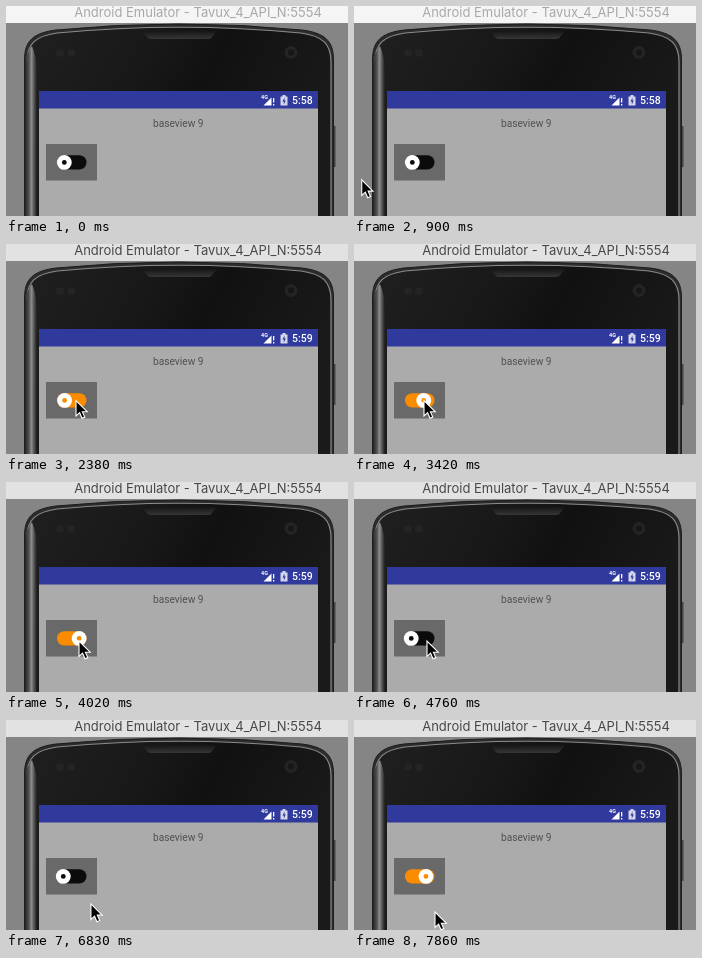
Write an HTML page that moves like this. It is 342 px wide and 210 px high and loops after 8000 ms.

```html
<!DOCTYPE html>
<html lang="en">
<head>
<meta charset="utf-8">
<title>Toggle switch in an emulator</title>
<style>
  html, body { margin: 0; width: 100%; height: 100%; overflow: hidden; background: #858585; }
  svg { display: block; width: 342px; height: 210px; }
  .title { font: 13px Inter, sans-serif; }
  .app { font-family: Roboto, sans-serif; }
</style>
</head>
<body>
<svg viewBox="0 0 342 210">
  <defs>
    <linearGradient id="body" x2="1" y2=".35">
      <stop offset="0" stop-color="#202020"/>
      <stop offset=".4" stop-color="#181818"/>
      <stop offset=".6" stop-color="#111"/>
      <stop offset="1" stop-color="#1a1a1a"/>
    </linearGradient>
    <linearGradient id="edge">
      <stop offset="0" stop-color="#303030"/>
      <stop offset=".25" stop-color="#505050"/>
      <stop offset=".5" stop-color="#8c8c8c"/>
      <stop offset=".75" stop-color="#505050"/>
      <stop offset="1" stop-color="#1c1c1c"/>
    </linearGradient>
    <linearGradient id="speaker" x2="0" y2="1">
      <stop offset="0" stop-color="#161616"/>
      <stop offset="1" stop-color="#363636"/>
    </linearGradient>
  </defs>

  <rect width="342" height="210" fill="#858585"/>
  <rect id="bar" width="342" height="17"/>
  <text id="title" class="title" x="192" y="11" text-anchor="middle">Android Emulator - Tavux_4_API_N:5554</text>

  <!-- phone -->
  <path d="M328 120h1.500v41h-1.500z" fill="#444"/>
  <path d="M18.500 215V54C18.500 35 27 27 50 24Q173 12 296 24C319 27 327.500 35 327.500 54V215z" fill="#2c2c2c" stroke="#1c1c1c"/>
  <path d="M21 215V56C21 38 29 30 51 27Q173 15.500 295 27C317 30 325 38 325 56V215z" fill="url(#body)" stroke="#8a8a8a" stroke-width="1.200"/>
  <path d="M20 210V58Q20 46 26 40Q31 52 31 66V210z" fill="url(#edge)"/>
  <path d="M136 25H211L206 31Q205 33 201 33H146Q142 33 141 31z" fill="url(#speaker)"/>
  <g fill="#242424">
    <circle cx="54" cy="47" r="4"/>
    <circle cx="65" cy="47" r="4"/>
    <circle cx="285" cy="46.500" r="6.500"/>
  </g>
  <circle cx="285" cy="46.500" r="3" fill="#17171b"/>

  <!-- screen -->
  <rect x="33" y="85" width="279" height="125" fill="#ababab"/>
  <rect x="33" y="85" width="279" height="17.500" fill="#30399c"/>
  <g class="app" fill="#fff">
    <text x="255" y="93" font-size="5.500" font-weight="700">4G</text>
    <path d="M257.500 99.500L265.500 91.500V99.500z"/>
    <path d="M267 92h1.300v4.500h-1.300zM267 98h1.300v1.500h-1.300z"/>
    <path d="M274.500 90.500h2v-1.500h3v1.500h2v9h-7z" opacity=".8"/>
    <path d="M278.500 91.500l-2 4h1.300v3l2-4H278.500z" fill="#30399c"/>
    <text id="clock" x="286" y="98" font-size="10.500" font-weight="500"></text>
  </g>
  <text class="app" x="172.300" y="121" text-anchor="middle" font-size="10.200" fill="#505050">baseview 9</text>
  <rect x="40" y="138" width="51" height="36.500" fill="#696969"/>

  <!-- switch -->
  <rect id="track" x="51" y="149.200" width="29.500" height="14.400" rx="7.200"/>
  <g id="thumb">
    <circle r="7.400" cy="156.400" fill="#fff"/>
    <circle id="dot" r="2.400" cy="156.400"/>
  </g>

  <path id="cursor" d="M0 0V15.500L3.600 12.200L6 17.800L8.800 16.600L6.400 11.200H11.200z" fill="#000" stroke="#fff" stroke-width="1.100"/>
</svg>
<script>
  const LOOP = 8000, STEP = 148.2, START = 600;
  const OFF_X = 58.3, ON_X = 73.2;
  const $ = id => document.getElementById(id);
  const paint = (id, color) => $(id).setAttribute('fill', color);
  const move = (id, ...xy) => $(id).setAttribute('transform', `translate(${xy})`);

  // Evenly spaced clicks; each one flips the switch, which begins off.
  const series = (first, gap, count) => Array.from({ length: count }, (_, i) => first + i * gap);
  const clicks = [...series(2375, 450, 3), ...series(4310, 1122, 4)];

  // The pointer rests between these eased moves.
  const moves = [
    { from: 600, to: 1490, x: 70, y: 156.5 },
    { from: 3420, to: 4010, x: 73, y: 159 },
    { from: 5340, to: 5930, x: 61.5, y: 163.5 },
    { from: 6530, to: 6970, x: 93, y: 191 },
    { from: 6970, to: 7410, x: 72, y: 163 },
    { from: 7560, to: 7860, x: 81, y: 192 }
  ];

  function pointerAt(t) {
    let x = -14, y = 180;
    for (const m of moves) {
      const u = Math.min(1, Math.max(0, (t - m.from) / (m.to - m.from)));
      const eased = u * u * (3 - 2 * u);
      x += (m.x - x) * eased;
      y += (m.y - y) * eased;
    }
    return [x, y];
  }

  function switchAt(t) {
    const past = clicks.filter(c => c <= t);
    const on = past.length % 2 === 1;
    const s = past.length ? (t - past.at(-1)) / 1000 : Infinity;
    const left = s < 2 ? Math.exp(-6 * s) * Math.cos(7.1 * s) : 0;
    const [start, end] = on ? [OFF_X, ON_X] : [ON_X, OFF_X];
    return { on, x: end + (start - end) * left };
  }

  function draw(time) {
    // The screen refreshes in coarse steps.
    const t = START + STEP * Math.floor((time + 8 - START) / STEP);
    const focused = t > 1600;
    paint('bar', focused ? '#e2e2e2' : '#f5f5f5');
    paint('title', focused ? '#484848' : '#a8a8a8');
    $('clock').textContent = t < 1040 ? '5:58' : '5:59';

    const { on, x } = switchAt(t);
    const color = on ? '#fb8c00' : '#0b0b0b';
    paint('track', color);
    paint('dot', color);
    move('thumb', x, 0);
    move('cursor', ...pointerAt(t));
  }

  const origin = performance.now();
  function tick() {
    draw((performance.now() - origin) % LOOP);
    requestAnimationFrame(tick);
  }
  tick();
</script>
</body>
</html>
```
